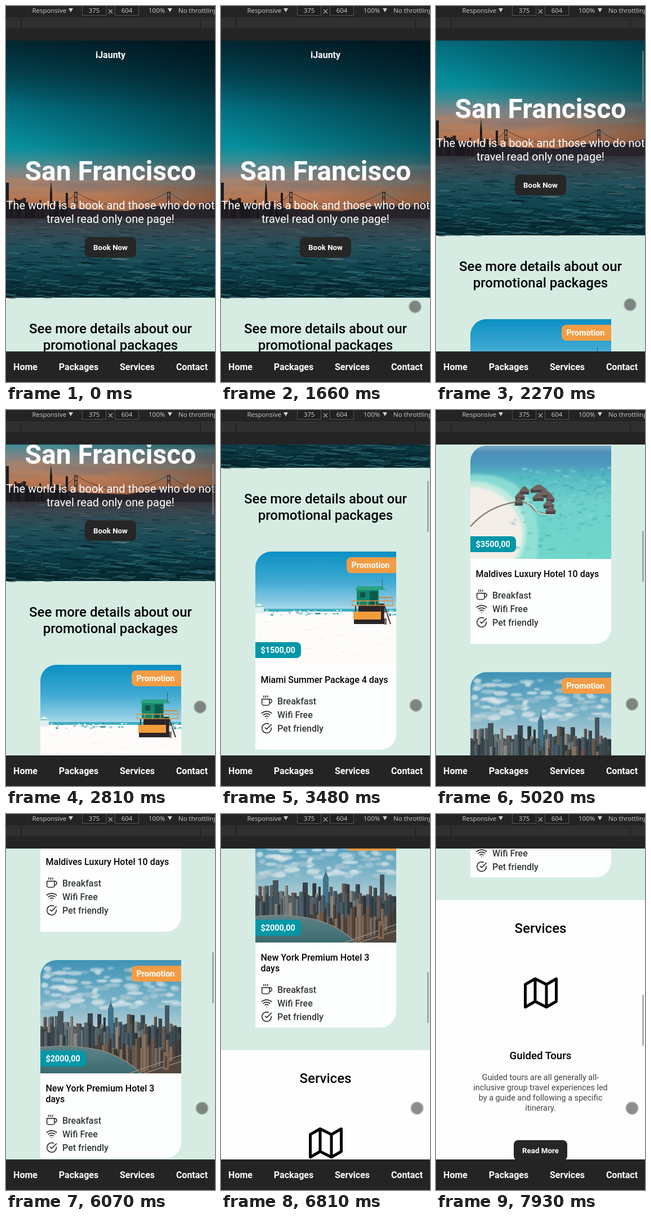
An HTML page that plays this animation: 371x664 px, repeating every 8000 ms.

```html
<!DOCTYPE html>
<html lang="en">
<head>
<meta charset="utf-8">
<title>Travel page on a phone</title>
<style>
html, body { margin: 0; width: 100%; height: 100%; overflow: hidden; background: #242424; }
svg { display: block; }
text { font-family: Roboto, Arial, sans-serif; }
.bar text { font: 11.5px "Open Sans", "Noto Sans", sans-serif; fill: #cfcfcf; }
.b { font-weight: 700; }
.h { font-weight: 500; }
.m { text-anchor: middle; }
.w { fill: #fff; }
.icon { fill: none; stroke-width: 2; stroke-linecap: round; stroke-linejoin: round; }
</style>
</head>
<body>
<script>
let seed = 7;
const rnd = (a = 0, b = 1) => {
  seed = (seed * 16807) % 2147483647;
  return a + (b - a) * seed / 2147483647;
};
const pick = list => list[Math.floor(rnd(0, list.length))];
const many = (n, fn) => Array.from({ length: n }, (_, i) => fn(i)).join('');

const rect = (x, y, w, h, fill, more = '') =>
  `<rect x="${x}" y="${y}" width="${w}" height="${h}" fill="${fill}" ${more}/>`;
const path = (d, fill, more = '') => `<path d="${d}" fill="${fill}" ${more}/>`;
const line = (d, color, w = 1, more = '') => path(d, 'none', `stroke="${color}" stroke-width="${w}" ${more}`);
const blob = (x, y, rx, ry, fill, more = '') =>
  `<ellipse cx="${x}" cy="${y}" rx="${rx}" ry="${ry}" fill="${fill}" ${more}/>`;
const text = (s, x, y, size, cls = '', fill = '') =>
  `<text x="${x}" y="${y}" font-size="${size}" class="${cls}" ${fill && `fill="${fill}"`}>${s}</text>`;
const grad = (id, stops, dir = 'x2="0" y2="1"') =>
  `<linearGradient id="${id}" ${dir}>${stops.map(([o, c]) =>
    `<stop offset="${o}" stop-color="${c}"/>`).join('')}</linearGradient>`;
const button = (s, x, y, w) =>
  rect(x, y, w, 36, '#262626', 'rx="8"') + text(s, 185.5, y + 23, 13.33, 'b m w');

const defs = `<defs>
${grad('dusk', [[0, '#03303c'], [.2, '#04515f'], [.38, '#04788a'], [.6, '#078f9c'], [.68, '#3f8c92'],
  [.73, '#75868a'], [.79, '#9c8275'], [.87, '#b87a55'], [1, '#9a5a3c']])}
${grad('shade', [[0, '#000c14'], [1, '#000c1400']], 'x1="1" y1="0" x2=".35" y2=".8"')}
${grad('bay', [[0, '#34343a'], [.12, '#3a464e'], [.35, '#23505b'], [.65, '#0f434e'], [1, '#05262e']])}
${grad('sky', [[0, '#0b90c4'], [.5, '#3fa9d2'], [.85, '#8ccbe3'], [1, '#b4deec']])}
${grad('lagoon', [[0, '#7ba9c4'], [.06, '#4c8fba'], [.16, '#4a98bb'], [.28, '#58bcc6'], [.5, '#70d2cc'], [1, '#6fd6cb']])}
${grad('air', [[0, '#3f93b6'], [.4, '#7fb6ca'], [.6, '#b3cdd4']])}
${grad('river', [[0, '#5d8488'], [1, '#3c6a70']])}
<filter id="soft"><feGaussianBlur stdDeviation="2.2"/></filter>
<filter id="haze"><feGaussianBlur stdDeviation=".8"/></filter>
<clipPath id="photo"><path d="M0 200V28A28 28 0 0 1 28 0H250V200Z"/></clipPath>
</defs>`;

function hero() {
  const houses = many(30, i => {
    const h = rnd(20, 42) - i * .4;
    return rect(i * 3.7, 376 - h, rnd(3, 7), h, pick(['#1b1b20', '#262024', '#17191e']));
  });
  const waves = many(420, () => {
    const k = rnd(), y = 379 + 136 * k, x = rnd(-30, 371), w = rnd(6, 16) + 26 * k;
    const tone = pick(['#01141b', '#01141b', '#041f28', k < .5 ? '#8a8078' : '#3c7881', '#3b7f88']);
    return line(`M${x} ${y}q${w / 4} ${-2.5 * k} ${w / 2} 0t${w / 2} ${rnd(-1, 1)}`, tone, .7 + 1.8 * k,
      `opacity="${rnd(.2, .55)}"`);
  });
  const hills = 'M0 376V352L40 350 110 356 150 360 215 362 250 356 290 350 330 353 371 345V376Z';
  const tower = x => line(`M${x - 2} 376V328M${x + 2} 376V328M${x - 3} 329h6m-6 9h6m-6 9h6`, '#2a2428', 1.4);
  return rect(0, 61, 371, 315, 'url(#dusk)') + rect(0, 61, 371, 315, 'url(#shade)', 'opacity=".75"')
    + `<g filter="url(#soft)">${many(16, () =>
      blob(rnd(0, 371), rnd(285, 335), rnd(25, 70), rnd(2, 5), pick(['#75706f', '#c08058', '#5f8084']), 'opacity=".35"'))}</g>`
    + path(hills, '#26232a') + houses
    + rect(0, 312, 5, 64, '#1b1b20') + path('M78 376V330L80 309 82 330V376Z', '#1b1b20')
    + rect(106, 330, 4, 46, '#1b1b20')
    + line('M84 352Q110 350 124 329Q205 378 289 328Q325 358 371 356', '#3a2d2c', .8)
    + line('M115 353H371', '#c99a80', 1, 'opacity=".55"') + tower(124) + tower(289)
    + rect(0, 375, 371, 140, 'url(#bay)') + waves
    + text('iJaunty', 185.5, 92, 16, 'b m w')
    + text('San Francisco', 185.5, 308, 48, 'b m w')
    + text('The world is a book and those who do not', 185.5, 359, 20, 'm w')
    + text('travel read only one page!', 185.5, 383, 20, 'm w')
    + button('Book Now', 140, 408, 91);
}

function beach() {
  return rect(0, 0, 250, 106, 'url(#sky)')
    + rect(0, 101, 250, 6, '#3fb0c0') + rect(0, 106, 250, 94, '#fdfcfa')
    + many(80, () => rect(rnd(12, 250), rnd(102, 111), rnd(2, 5), rnd(1, 3), pick(['#2aa7b4', '#8fd3d8', '#e8f4f3', '#467f8c'])))
    + many(50, () => rect(rnd(0, 250), rnd(115, 198), rnd(3, 10), 1, '#f0ebe6'))
    + path('M0 96L6 91 15 96V109H0Z', '#dff0ee') + rect(0, 96, 15, 2, '#7fc9c0')
    + rect(183, 92, 46, 36, '#2b2426') + rect(178, 80, 65, 2, '#c98a3c')
    + rect(180, 66, 39, 28, '#12876a') + rect(203, 70, 14, 24, '#0b5b4b') + rect(186, 72, 9, 9, '#174f4a')
    + path('M177 68L181 61H225L231 68Z', '#2aa484') + rect(225, 49, 1, 16, '#555')
    + line('M171 87H245M171 95H246M172 86v10M185 86v10M199 86v10M213 86v10M229 82v14M244 82v14', '#d8954a', 1.3)
    + line('M229 96L240 128M222 96V126M178 96V110', '#3a3030', 2)
    + rect(174, 106, 49, 14, '#f09d3a') + rect(175, 120, 50, 8, '#2b2426')
    + blob(231, 106, 1.8, 2, '#6b4b3e') + rect(228.5, 108, 5, 10, '#e3e2e2') + rect(229, 118, 4, 11, '#7b6a63');
}

function island() {
  const hut = (x, y, w) => path(`M${x} ${y + 9}L${x + w * .4} ${y}H${x + w * .6}L${x + w} ${y + 9}Z`, '#6e6360')
    + rect(x + 2, y + 9, w - 4, 5, '#4b4544');
  return rect(0, 0, 250, 200, 'url(#lagoon)')
    + `<g filter="url(#soft)">${path('M-5 52Q50 45 90 75Q130 120 118 205H-5Z', '#9fe6da', 'opacity=".7"')}
      ${path('M-5 64Q30 60 62 80Q100 112 99 155Q96 188 82 205H-5Z', '#c3ebdf')}
      ${path('M-5 74Q30 70 58 92Q92 122 92 158Q89 188 74 205H-5Z', '#f3efe8')}</g>`
    + `<g filter="url(#haze)">${many(240, () => {
      const y = 38 + 160 * rnd() * rnd(.3, 1), x = rnd(100 - y * .2, 250);
      return blob(x, y, rnd(1.5, 6), rnd(.8, 2.4), pick(['#3d9fa8', '#429fae', '#9ae6da', '#4fb9b5']), `opacity="${rnd(.25, .6)}"`);
    })}</g>`
    + line('M0 143Q30 108 78 100Q104 97 110 110Q117 121 150 120', '#8d8078', 2.5)
    + line('M100 101Q112 103 116 113T150 121', '#d5e6e0', 1.5)
    + hut(78, 82, 20) + hut(86, 72, 20) + hut(105, 69, 32) + hut(118, 78, 28) + hut(109, 84, 23)
    + hut(133, 86, 18) + hut(128, 97, 22) + hut(132, 107, 21) + hut(77, 92, 18);
}

function city() {
  const tones = ['#3f4c53', '#56646a', '#2f3b41', '#6f7a7b', '#675a53', '#485c66', '#8b8680'];
  const row = (n, x0, x1, top, low, base, list) => many(n, i => {
    const x = x0 + (x1 - x0) * i / n + rnd(-2, 2), w = rnd(4, 10), y = rnd(top, low);
    return rect(x, y, w, base - y, pick(list)) + rect(x + w * .6, y + 1, w * .4, base - y, '#1d272c', 'opacity=".4"');
  });
  return rect(0, 0, 250, 200, 'url(#air)')
    + `<g filter="url(#haze)">${many(90, i => blob(rnd(0, 250), rnd(12, 85), rnd(4, 15), rnd(2, 5),
      i % 4 ? '#e3eaeb' : '#b5cad1', `opacity="${rnd(.35, .75)}"`))}</g>`
    + rect(0, 118, 250, 82, '#3f4a4c')
    + row(42, 0, 250, 94, 122, 152, tones)
    + path('M120 150V86L125 74 130 86V150Z', '#41738a') + rect(124.5, 68, 1, 10, '#5b7079')
    + rect(31, 90, 10, 60, '#46545a') + rect(84, 94, 9, 54, '#37444b') + rect(221, 80, 8, 65, '#46565f')
    + row(38, 0, 250, 112, 136, 162, tones)
    + row(30, 95, 250, 130, 160, 200, ['#6f5647', '#54443b', '#8a6f5c', '#463f3b', '#786c63'])
    + path('M0 153Q60 148 105 159Q150 171 178 200H0Z', 'url(#river)')
    + line('M0 154Q60 148 105 159Q150 171 178 200', '#8f887d', 1.5)
    + path('M178 200L250 172V200Z', '#51473f') + line('M158 200L250 168M184 200L250 179', '#9a8474', 1.6)
    + rect(218, 162, 10, 32, '#85664f') + rect(221, 170, 4, 20, '#4f4540');
}

const icons = [
  'M18 8h1a4 4 0 0 1 0 8h-1M2 8h16v9a4 4 0 0 1-4 4H6a4 4 0 0 1-4-4V8zM6 1v3M10 1v3M14 1v3',
  'M5 12.55a11 11 0 0 1 14.08 0M1.42 9a16 16 0 0 1 21.16 0M8.53 16.11a6 6 0 0 1 6.95 0M12 20h.01',
  'M22 11.08V12a10 10 0 1 1-5.93-9.14M22 4L12 14.01 9 11.01'
];

function card(y, photo, price, title, promo) {
  const drop = (title.length - 1) * 19;
  const items = ['Breakfast', 'Wifi Free', 'Pet friendly'].map((s, i) => {
    const base = 270 + drop + 24 * i;
    return `<path class="icon" stroke="#333" transform="translate(10 ${base - 16}) scale(.8333)" d="${icons[i]}"/>`
      + text(s, 39, base, 16, 'h', '#333836');
  }).join('');
  return `<g transform="translate(61 ${y})">
    ${path('M0 350V28A28 28 0 0 1 28 0H250V322A28 28 0 0 1 222 350Z', '#fdfefe')}
    <g clip-path="url(#photo)">${photo()}</g>
    ${path('M0 160H73a8 8 0 0 1 8 8v12a8 8 0 0 1-8 8H0Z', '#0097a7')}${text(price, 9.5, 179, 14.4, 'b w')}
    ${promo ? path('M250 10H170a8 8 0 0 0-8 8v12a8 8 0 0 0 8 8H250Z', '#f39c45') + text('Promotion', 170.5, 29, 14.4, 'b w') : ''}
    ${title.map((s, i) => text(s, 9.5, 232 + 19 * i, 16, 'h')).join('')}${items}</g>`;
}

const services = () => rect(0, 1853, 371, 900, '#fefefe')
  + text('Services', 185.5, 1911, 24, 'h m')
  + `<path class="icon" stroke="#000" transform="translate(156 1987) scale(2.5)" d="M1 6V22L8 18 16 22 23 18V2L16 6 8 2ZM8 2V18M16 6V22"/>`
  + text('Guided Tours', 185.5, 2134, 18.72, 'h m')
  + ['Guided tours are all generally all-', 'inclusive group travel experiences led',
    'by a guide and following a specific', 'itinerary.']
    .map((s, i) => text(s, 185.5, 2171 + 18 * i, 14.4, 'm', '#444')).join('')
  + button('Read More', 138, 2277, 95);

const page = () => rect(0, 515, 371, 1338, '#d6ece2') + hero()
  + text('See more details about our', 185.5, 578, 24, 'h m')
  + text('promotional packages', 185.5, 607, 24, 'h m')
  + card(663, beach, '$1500,00', ['Miami Summer Package 4 days'], true)
  + card(1063, island, '$3500,00', ['Maldives Luxury Hotel 10 days'], false)
  + card(1463, city, '$2000,00', ['New York Premium Hotel 3', 'days'], true)
  + services();

const field = (x, s) => rect(x + .5, -4.5, 42, 21, '#202020', 'stroke="#555"') + text(s, x + 21.5, 12, 11.5, 'm');
const arrow = x => path(`M${x} 4h8l-4 7z`, '#cfcfcf');
const toolbar = `<g class="bar">${rect(0, 0, 371, 61, '#242424')}${rect(0, 21, 371, 1, '#414141')}
  ${rect(0, 23, 371, 16, '#303030')}${rect(26, 23, 2, 16, '#222')}${rect(344, 23, 2, 16, '#222')}
  ${text('Responsive', 46.5, 12)}${arrow(111)}${field(135, '375')}${field(193, '604')}
  ${line('M182 6l7 7m0-7l-7 7', '#aaa', 1.2)}${text('100%', 253, 12)}${arrow(287)}${text('No throttling', 306, 12)}</g>`;
const nav = rect(0, 610, 371, 54, '#242424')
  + [['Home', 34.5], ['Packages', 129], ['Services', 233], ['Contact', 330]]
    .map(([s, x]) => text(s, x, 643, 16, 'b m w')).join('');

document.body.innerHTML = `<svg width="371" height="664" viewBox="0 0 371 664">${defs}
  <svg y="61" width="371" height="549"><g id="page">${page()}</g></svg>
  <rect id="thumb" x="366" width="3" height="90" fill="#808a88" opacity=".65"/>
  <circle id="dot" r="10.8" fill="#3c3a38" fill-opacity=".58" stroke="#aebdb6" stroke-opacity=".85" stroke-width="1.8"/>
  ${toolbar}${nav}</svg>`;

// start, end, steps, scroll from, scroll to, wheel notches, pointer at the end
const moves = [
  [1860, 2540, 10, 0, 200, 2, 344.5, 525],
  [2810, 3010, 4, 200, 300, 1, 344.5, 523],
  [3150, 3950, 12, 300, 600, 3, 348, 519.5],
  [4020, 4150, 3, 600, 623, 1, 348, 519.5],
  [4220, 4420, 3, 623, 800, 1, 348, 519.5],
  [4750, 5020, 5, 800, 1000, 1, 348, 519.5],
  [5340, 5550, 4, 1000, 1100, 1, 348, 519.5],
  [5810, 6540, 11, 1100, 1400, 3, 348, 519.5],
  [6740, 6940, 4, 1400, 1500, 1, 348, 519.5],
  [7270, 7930, 9, 1500, 1701, 2, 348, 519.5]
];
const enter = [[318, 568], [355, 528], [344.5, 531]];
const notch = [0, .13, .36, .8, 1, 1];
const mix = (a, b, k) => a + (b - a) * k;
const ease = u => {
  const i = Math.floor(u * 4);
  return mix(notch[i], notch[i + 1], u * 4 - i);
};
const stepAt = (t, a, b, n) => Math.min(n - 1, Math.floor((t - a) / (b - a) * (n - 1) + .01));

function state(t) {
  const k = moves.filter(m => m[0] <= t).length - 1;
  if (k < 0) {
    const u = stepAt(Math.max(t, 980), 980, 1660, 10) / 9 * 2, i = Math.min(1, Math.floor(u));
    const [p, q] = [enter[i], enter[i + 1]];
    return { scroll: 0, x: mix(p[0], q[0], u - i), y: mix(p[1], q[1], u - i) };
  }
  const [a, b, n, from, to, count, x, y] = moves[k];
  const [px, py] = k ? moves[k - 1].slice(6) : enter[2];
  const u = (stepAt(t, a, b, n) + 1) / n, v = u * count, j = Math.min(count - 1, Math.floor(v));
  return { scroll: Math.round(mix(from, to, (j + ease(v - j)) / count)), x: mix(px, x, u), y: mix(py, y, u) };
}

const [pageEl, thumb, dot] = ['page', 'thumb', 'dot'].map(id => document.getElementById(id));
function draw() {
  const t = performance.now() % 8000, { scroll, x, y } = state(t);
  pageEl.setAttribute('transform', `translate(0 ${-61 - scroll})`);
  thumb.setAttribute('y', 63 + scroll * .1505);
  thumb.style.display = t < 1860 ? 'none' : '';
  dot.setAttribute('transform', `translate(${x} ${y})`);
  dot.style.display = t < 980 ? 'none' : '';
  requestAnimationFrame(draw);
}
draw();
</script>
</body>
</html>
```
